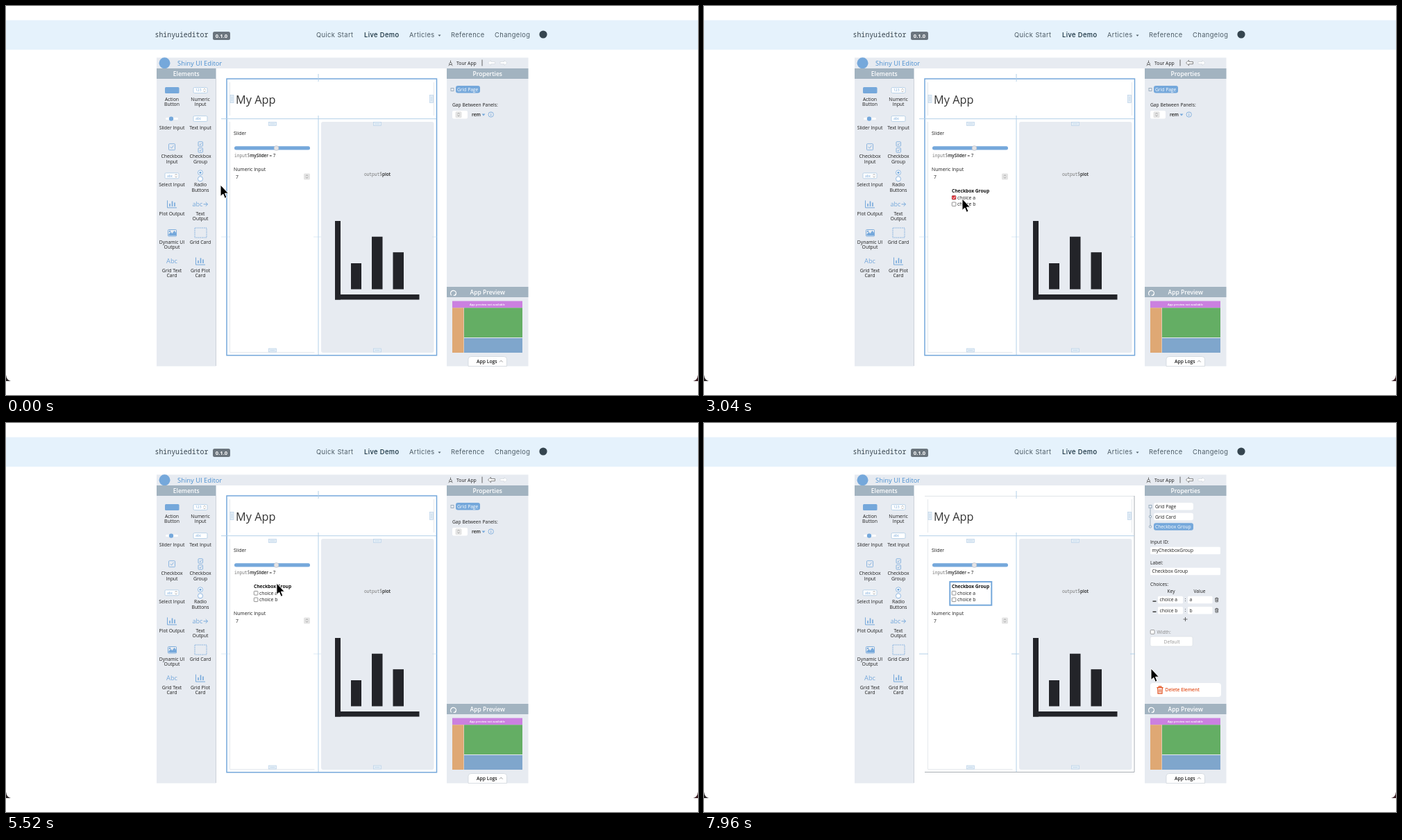
Write an HTML page that moves like this. It is 997 px wide and 561 px high and loops after 8 s.

```html
<!DOCTYPE html>
<html lang="en">
<head>
<meta charset="utf-8">
<title>UI editor demo</title>
<style>
html, body { margin: 0; width: 100%; height: 100%; overflow: hidden; background: #fff; }
svg { display: block; width: 100vw; height: 100vh; font-family: "Open Sans", "Noto Sans", sans-serif; white-space: pre; }
.nav { font-family: Inter, sans-serif; letter-spacing: .42px; }
.mono { font-family: "Noto Sans Mono", monospace; }
</style>
</head>
<body>
<svg id="stage" viewBox="0 0 997 561"></svg>
<script>
const BLUE = '#75a8db', PANEL = '#e7ebf1', BAR = '#a2b3c0', INK = '#1c1c1c', ORANGE = '#fa5514', PALE = '#b9d2e8';

// Markup helpers
const rect = (x, y, w, h, fill, more = '') => `<rect x="${x}" y="${y}" width="${w}" height="${h}" fill="${fill}" ${more}/>`;
const box = (x, y, w, h, stroke, width = .8, more = '') => rect(x, y, w, h, 'none', `stroke="${stroke}" stroke-width="${width}" ${more}`);
const line = (d, stroke, width = .8, more = '') => `<path d="${d}" fill="none" stroke="${stroke}" stroke-width="${width}" ${more}/>`;
const dot = (x, y, r, fill, more = '') => `<circle cx="${x}" cy="${y}" r="${r}" fill="${fill}" ${more}/>`;
const text = (x, y, str, size = 6.85, fill = INK, more = '') => `<text x="${x}" y="${y}" font-size="${size}" fill="${fill}" ${more}>${str}</text>`;
const mid = (x, y, str, size, fill, more = '') => text(x, y, str, size, fill, 'text-anchor="middle" ' + more);
const group = (id, body) => `<g id="${id}">${body}</g>`;

const check = (x, y, s) => box(x, y, s, s, BLUE, .8, 'rx="1"') + line(`M${x + s * .25} ${y + s * .5}l${s * .2} ${s * .22} ${s * .32} ${-s * .45}`, BLUE, .8);
const field = (x, y, str) => box(x - 10, y - 4, 20, 8, PALE, 1, 'rx="1.5" style="fill:#fff"') + text(x - 7, y + 1.8, str, 5, BLUE);
const updown = (x, y) => line(`M${x - 1.5} ${y - .8}l1.5 -1.5 1.5 1.5M${x - 1.5} ${y + .8}l1.5 1.5 1.5 -1.5`, '#888', .7);
const spinner = (x, y) => rect(x - 4.5, y - 4.5, 9, 9, '#e4e4e4', 'rx="1.5"') + updown(x, y);
const bars = (x, y) => line(`M${x - 6.5} ${y - 5.5}v10.5h13.5`, BLUE, 1) + line(`M${x - 3} ${y + 3}v-4M${x + .5} ${y + 3}v-7.5M${x + 4} ${y + 3}v-5.5`, BLUE, 1.6);
const twoChecks = (x, y) => check(x - 3, y - 8, 6.5) + check(x - 3, y + 1, 6.5);

const icons = [
  (x, y) => rect(x - 10, y - 4.5, 20.5, 9, BLUE, 'rx="1.5"'),
  (x, y) => field(x, y, '123') + updown(x + 6, y),
  (x, y) => rect(x - 9, y - 1.5, 18, 3, '#fff', 'rx="1.5"') + dot(x - 1, y, 3.2, BLUE),
  (x, y) => field(x, y, 'abc'),
  (x, y) => check(x - 4.5, y - 5, 9),
  twoChecks,
  (x, y) => field(x, y, 'abc') + updown(x + 6, y),
  (x, y) => [-4.5, 4.5].map(d => dot(x, y + d, 3.5, '#fff', `stroke="${BLUE}" stroke-width=".8"`)).join('') + dot(x, y - 4.5, 1.6, BLUE),
  bars,
  (x, y) => mid(x - 4, y + 3, 'abc', 9, BLUE) + line(`M${x + 4.5} ${y}h6m-2.8 -2.8l2.8 2.8 -2.8 2.8`, BLUE, 1),
  (x, y) => box(x - 5.5, y - 4.5, 12, 9.5, BLUE, .9, 'rx="1"') + `<path d="M${x - 4.5} ${y + 4}v-2l3-3 2 2 3-4 2.5 3v4z" fill="${BLUE}"/>` + dot(x - 3, y - 2, 1.2, BLUE),
  (x, y) => box(x - 8, y - 7, 17, 14, BLUE, .9, 'stroke-dasharray="1.6 1"'),
  (x, y) => mid(x, y + 3.3, 'Abc', 9.2, BLUE),
  bars
];
const labels = 'Action/Button,Numeric/Input,Slider Input,Text Input,Checkbox/Input,Checkbox/Group,Select Input,Radio/Buttons,Plot Output,Text/Output,Dynamic UI/Output,Grid Card,Grid Text/Card,Grid Plot/Card'.split(',');
const caption = (x, y, str) => str.split('/').map((part, i) => mid(x, y + 7.3 * i, part)).join('');
const elements = labels.map((label, i) => {
  const x = i % 2 ? 280 : 239, y = 121.5 + 41.1 * (i >> 1);
  return icons[i](x, y) + caption(x, y + 15.6, label);
}).join('');

const title = (x, w, y, str) => rect(x, y, w, 15, BAR) + mid(x + w / 2, y + 10.7, str, 8.5, '#fff', 'font-weight="600"');
const pill = (y, w, str, on) => rect(648, y, w, 10.5, on ? BLUE : '#fff', 'rx="3"') + text(650, y + 7.7, str, 6.7, on ? '#fff' : INK);
const input = (x, y, w, str) => rect(x, y, w, 10.5, '#fff', 'rx="1.5"') + text(x + 2.5, y + 7.6, str, 6.7);
const bin = (x, y, s, color) => `<g transform="translate(${x} ${y}) scale(${s})">${line('M-4-3H4M-1.5-3v-1.5h3V-3M-3-3l.4 7.5h5.2L3-3M-1-1v4M1-1v4', color, 1)}</g>`;
const arrow = (x, dir) => `<path d="M${x - 5 * dir} 82l${4 * dir} -3.8v2.2h${6 * dir}v3.2h${-6 * dir}v2.2z" fill="#fff" stroke-width=".7"/>`;

const handles = [[384, 170, 0], [535, 170, 0], [384, 496.5, 0], [535, 496.5, 0], [325.5, 134, 1], [613, 134, 1]].map(([x, y, tall]) => {
  const w = tall ? 5 : 11, h = 16 - w;
  return rect(x - w / 2, y - h / 2, w, h, '#e3edf6', `stroke="${PALE}" stroke-width=".7"`) +
    line(tall ? `M${x} ${y - 3}v6` : `M${x - 3} ${y}h6`, PALE, 1, 'stroke-dasharray="1.4 .8"');
}).join('');

const tick = (x, y, id) => rect(x, y, 5.6, 5.6, '#fff', 'stroke="#666" stroke-width=".7" rx=".8"') +
  (id ? `<g class="${id}">${rect(x, y, 5.6, 5.6, '#dc2f37', 'rx=".8"')}${line(`M${x + 1.2} ${y + 2.9}l1.3 1.4 2.1 -3`, '#fff', .9)}</g>` : '');
const choices = text(357, 269.3, 'Checkbox Group', 6.65, '#111', 'font-weight="700"') +
  tick(357.3, 273.5, 'checked') + text(365, 278.9, 'choice a') +
  tick(357.3, 283, '') + text(365, 288.4, 'choice b');

const nav = [[447, 'Quick Start'], [516, 'Live Demo'], [581, 'Articles'], [641, 'Reference'], [704, 'Changelog']]
  .map(([x, str]) => text(x, 45, str, 9.3, str == 'Live Demo' ? '#102a38' : '#4b5a64', `class="nav" font-weight="${str == 'Live Demo' ? 500 : 400}"`)).join('');

const page =
  rect(0, 20.5, 997, 42.5, '#e5f2fc') +
  text(214.5, 45, 'shinyuieditor', 9.85, '#36434c', 'class="mono"') +
  rect(298, 37, 25, 12, '#6b757d', 'rx="2.5"') + mid(310.5, 45.8, '0.1.0', 7.6, '#fff', 'font-weight="700"') +
  nav + '<path d="M622.5 41.5h4l-2 2.2z" fill="#4b5a64"/>' + dot(774, 41, 5.6, '#35454f') +
  '<path d="M0 532Q1 540 7 541H0z" fill="#2a2527"/><path d="M997 532Q996 540 990 541H997z" fill="#40242a"/>' +
  rect(217, 74.5, 535.5, 15.5, PANEL) + rect(217, 90, 85.5, 429.5, PANEL) + rect(635, 90, 117.5, 429.5, PANEL) +
  line('M302.5 105V519', '#c3cad2') +
  dot(228.5, 82.3, 8, BLUE) + text(247, 85.8, 'Shiny UI Editor', 9.4, '#4a8fd0') +
  title(217, 85.5, 90, 'Elements') + title(635, 117.5, 90, 'Properties') + title(635, 117.5, 405, 'App Preview') +
  line('M640.5 78.5v3.5M638.8 82.5q1.7 -3 3.4 0v2h-3.4zM637.5 86l2 -1.5M643.5 86l-2 -1.5', '#555', .8) +
  text(649, 84.6, 'Tour App', 6.8) + line('M686 77.5v9', '#555', .9) +
  `<g id="undo">${arrow(699.5, 1)}</g><g stroke="#d3d8de">${arrow(717, -1)}</g>` + elements +
  group('hover', box(261.8, 191.5, 37.2, 37.5, '#bcc3cb', .8, 'rx="3"'));

const grid =
  line('M322.5 110v48M616.5 110v48M322.5 167v332.5h122', '#dfe4e9') +
  rect(454, 167, 162.5, 333, PANEL, 'rx="3"') +
  group('frame', box(318, 105, 302.5, 398.8, BLUE, 1.5)) +
  group('plainFrame', line('M318 105.5h302', '#d9dee3') + line('M620 105v398.5h-302', '#a9afb5', 1)) +
  line('M450 98v11M450 158v345M310 162.7h310', '#b3d0e8', 1) +
  group('rowLine', line('M310 333h13M443 333h11M614 333h7', '#b3d0e8', 1)) + handles +
  text(331, 140.5, 'My App', 16.3, '#333') +
  text(328, 186.4, 'Slider') + rect(329, 202.2, 109, 5.4, BLUE, 'rx="2.5"') +
  dot(389.5, 205, 3.4, '#e3e3e6', 'stroke="#b9bdc4" stroke-width=".6"') +
  text(329, 217.7, '<tspan fill="#777" class="mono" font-size="6.2">input$</tspan><tspan font-weight="600">mySlider</tspan> = 7', 6.3) +
  group('numeric', text(328, 238.4, 'Numeric Input') + text(331, 248.7, '7') + spinner(433.5, 246)) +
  mid(535, 244.7, '<tspan fill="#777" class="mono" font-size="6.2">output$</tspan><tspan font-weight="600">plot</tspan>', 6.4) +
  [[474, 310, 8, 113.5], [474, 416, 121.5, 7.5], [497, 371, 15, 37.5], [527, 332.7, 15.5, 75.8], [557.5, 355.2, 15.5, 53.3]].map(r => rect(...r, '#232429')).join('');

const preview =
  line('M641.8 417.3a4 4 0 1 1 5.2 0.2m.4 -2.4l-.4 2.4 -2.4 -.2', '#fff', 1.1) +
  rect(643, 425.5, 101, 9.8, '#cb80e0') + mid(693.5, 432, 'App preview not available', 4.1, '#fff', 'font-weight="600"') +
  rect(643, 435.3, 16.5, 64.7, '#dfa874') + rect(660, 435.3, 84, 42.7, '#64ae64') + rect(660, 479, 84, 21, '#7fa6cc') +
  '<path d="M666 519.5v-10q0-4 4-4h47.500q4 0 4 4v10z" fill="#fff" stroke="#cbd2d9" stroke-width=".7"/>' +
  text(678, 514.9, 'App Logs', 6.8, INK, 'font-weight="600"') + line('M711 513.5l2.3 -2.3 2.3 2.3', '#777', .8);

const pageProps =
  box(641, 118.5, 4, 4, '#8ba0b3') + pill(115, 35, 'Grid Page', true) +
  text(643, 145.2, 'Gap Between Panels:', 6.7) + rect(643, 151, 22, 11.5, '#fff', 'rx="2"') + spinner(652, 156.7) +
  text(671, 159, 'rem', 6.7, INK, 'font-weight="600"') + `<path d="M685.5 155.500h5l-2.500 3z" fill="${BLUE}"/>` +
  dot(698.7, 156.5, 3.7, 'none', `stroke="${BLUE}" stroke-width=".8"`) + line('M698.7 154.2v1M698.7 156v2.600', BLUE, .9);

const row = (y, str) => rect(646.5, y + 1.4, 5, 1.4, '#333') + input(654, y - 5.2, 36, `choice ${str}`) + text(692.5, y + 2.2, ':') +
  input(697, y - 5.2, 35.5, str) + bin(738.7, y, .65, '#333');
const groupProps =
  line('M643 121v28', '#8ba0b3') + box(641, 118.5, 4, 4, '#8ba0b3', .8, `style="fill:${PANEL}"`) +
  dot(643, 135, 1.7, PANEL, 'stroke="#8ba0b3" stroke-width=".8"') + dot(643, 149.5, 1.7, PANEL, 'stroke="#8ba0b3" stroke-width=".8"') +
  pill(115, 57, 'Grid Page') + pill(129.8, 57, 'Grid Card') + pill(144.300, 57, 'Checkbox Group', true) +
  text(643, 174.4, 'Input ID:', 6.7) + input(643, 178.7, 101, 'myCheckboxGroup') +
  text(643, 204.2, 'Label:', 6.7) + input(643, 208.7, 101, 'Checkbox Group') +
  text(643, 235, 'Choices:', 6.7) + mid(673, 245.4, 'Key', 6.6) + mid(714, 245.4, 'Value', 6.6) +
  row(255, 'a') + row(270.2, 'b') + line('M690.500 283h6M693.500 280v6', '#555', .9) +
  box(643.2, 298.5, 5.8, 5.8, '#777', .7, 'rx="1" style="fill:#fff"') + text(652.5, 303.7, 'Width:', 6.7, '#888') +
  rect(643, 308, 61, 14, '#fff', 'rx="2" stroke="#d8dde2" stroke-width=".6"') + mid(674, 317.6, 'Default', 6.8, '#999') +
  rect(643, 375, 102, 20, '#fff', 'rx="4"') + bin(657, 385, 1.15, '#e2501f') + text(664.5, 387.4, 'Delete Element', 6.7, '#e2501f', 'font-weight="600"');

const stage = document.getElementById('stage');
stage.innerHTML = page + grid + preview + group('pageProps', pageProps) + group('groupProps', groupProps) +
  group('zones', '') + group('group', choices) + group('outline', box(354.3, 229, 60, 33.7, BLUE, 2)) +
  group('tile', box(261.8, 191.5, 37.2, 37.5, '#d7d7d7', .7, 'rx="3"') + `<g style="filter:grayscale(1)">${twoChecks(280, 203.7)}</g>` + caption(280, 219.300, 'Checkbox/Group')) +
  group('ghost', choices) +
  group('cursor', '<path d="M0 0V16.5L3.800 13.200 6.300 19.300 9 18.200 6.500 12.200H11.500Z" fill="#000" stroke="#fff" stroke-width="1"/>');

const parts = Object.fromEntries([...stage.querySelectorAll('[id]')].map(el => [el.id, el]));
const show = (name, on) => parts[name].style.display = on ? '' : 'none';
const move = (name, x, y) => parts[name].setAttribute('transform', `translate(${x} ${y})`);
parts.tile.style.opacity = parts.ghost.style.opacity = .5;

// Pointer path: time, x, y
const path = [[0, 309, 258], [480, 309, 258], [640, 300, 249], [800, 300, 249], [1040, 287, 218], [1360, 287, 218],
  [2000, 358, 306], [2160, 361, 309], [2240, 361, 309], [2560, 372, 278], [3160, 372, 278], [3640, 382, 275], [3760, 382, 275],
  [4520, 382, 226], [5400, 382, 226], [5760, 412, 245], [6600, 412, 245], [7400, 619, 324], [7440, 620, 325], [7760, 620, 325], [7960, 644, 354], [8000, 644, 354]];

function pointer(t) {
  const i = path.findIndex(p => p[0] > t), a = path[i - 1], b = path[i];
  const k = (t - a[0]) / (b[0] - a[0]), e = k * k * (3 - 2 * k);
  return [a[1] + (b[1] - a[1]) * e, a[2] + (b[2] - a[2]) * e];
}

function draw(t) {
  const [x, y] = pointer(t);
  const dragNew = t >= 1400 && t < 2240, dragOld = t >= 3760 && t < 4680;
  const placed = t >= 2240, sorted = t >= 4680, selected = t >= 6040;
  const zones = [[170, 5.500], [223.500, 5.500]];
  if (dragNew) zones.push([253.700, 242.500]);
  const edge = dragOld ? 2 : 1.6;
  parts.zones.innerHTML = dragNew || dragOld ? zones.map(([top, h]) => {
    const over = x > 326 && x < 443 && y > top - 2 && y < top + h + 2;
    return over ? rect(326, top, 117, h, ORANGE) : box(326 + edge / 2, top + edge / 2, 117 - edge, h - edge, ORANGE, edge);
  }).join('') : '';
  show('hover', t >= 960 && t < 1400);
  show('tile', dragNew);
  move('tile', x - 287, y - 218);
  show('ghost', dragOld);
  move('ghost', x - 382, y - 275);
  show('group', placed);
  move('group', 0, sorted ? -31 : 0);
  move('numeric', 0, sorted ? 39 : 0);
  stage.querySelectorAll('.checked').forEach(el => el.style.display = t >= 2920 && !sorted ? '' : 'none');
  parts.undo.setAttribute('stroke', placed ? '#555' : '#d3d8de');
  show('outline', selected);
  show('frame', !selected);
  show('plainFrame', selected);
  show('pageProps', !selected);
  show('groupProps', selected);
  parts.rowLine.style.opacity = t >= 7760 ? 1 : .45;
  move('cursor', x, y);
}

function tickClock(now) {
  draw(now % 8000);
  requestAnimationFrame(tickClock);
}
draw(0);
requestAnimationFrame(tickClock);
</script>
</body>
</html>
```
